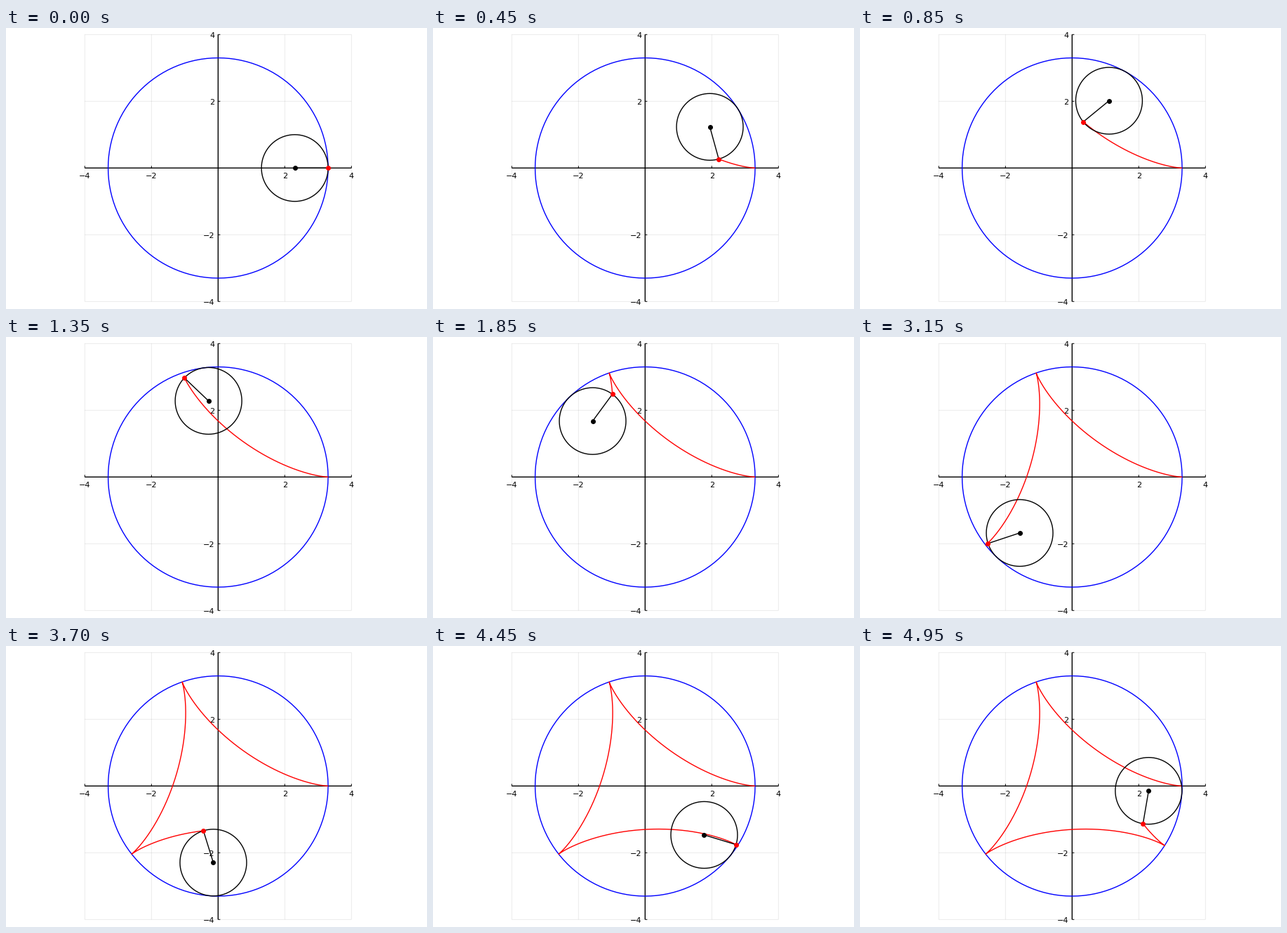
Recreate the animation shown at these times as a matplotlib script. Size 600 by 400 pixels, loop 5 s.

```python
import numpy as np
import matplotlib.pyplot as plt
from matplotlib.animation import FuncAnimation

W, H, DPI = 600, 400, 100
FRAMES, INTERVAL = 100, 50
CX, CY, UNIT = 302.3, 199.3, 47.5   # origin and scale in pixels
R, r = 3.3, 1.0                     # fixed and rolling radius
PX = 72 / DPI                       # points per pixel
LINE = 1.4 * PX


def to_px(x, y):
    return CX + UNIT * np.asarray(x), CY - UNIT * np.asarray(y)


def hypocycloid(t):
    d = R - r
    return (d * np.cos(t) + r * np.cos(d / r * t),
            d * np.sin(t) - r * np.sin(d / r * t))


def circle(x, y, radius):
    a = np.linspace(0, 2 * np.pi, 241)
    return to_px(x + radius * np.cos(a), y + radius * np.sin(a))


fig = plt.figure(figsize=(W / DPI, H / DPI), dpi=DPI, facecolor="white")
ax = fig.add_axes([0, 0, 1, 1])
ax.set_xlim(0, W)
ax.set_ylim(H, 0)
ax.axis("off")


def line(xs, ys, color="black", width=LINE, z=3, **kw):
    return ax.plot(xs, ys, color=color, lw=width, zorder=z, snap=False,
                   solid_capstyle="butt", **kw)[0]


def dot(color, size, z):
    return ax.plot([], [], "o", color=color, ms=size * PX, mew=0,
                   zorder=z, snap=False)[0]


def label(x, y, value, align):
    ax.text(x, y, str(value).replace("-", "\u2212"), ha=align, va="baseline",
            fontsize=8, family="DejaVu Sans", color="black", zorder=2)


# grid, axes, ticks and labels
for v in (-4, -2, 0, 2, 4):
    gx, gy = to_px(v, v)
    if v == 0:
        line(*to_px([-4, 4], [0, 0]), z=2)
        line(*to_px([0, 0], [-4, 4]), z=2)
        continue
    line(*to_px([v, v], [-4, 4]), width=0.9 * PX, z=1, alpha=0.09)
    line(*to_px([-4, 4], [v, v]), width=0.9 * PX, z=1, alpha=0.09)
    line([gx, gx], [CY, CY - 3], width=PX, z=2)
    line([CX, CX + 3], [gy, gy], width=PX, z=2)
    label(gx, 214.3, v, "center")
    label(297.5, gy + 4.6, v, "right")

line(*circle(0, 0, R), color="blue")
trace = line([], [], color="red", z=4)
wheel = line([], [], z=5)
spoke = line([], [], z=6)
hub = dot("black", 7, 7)
pen = dot("red", 7, 8)


def update(i):
    t = 2 * np.pi * i / FRAMES
    hx, hy = (R - r) * np.cos(t), (R - r) * np.sin(t)
    px, py = hypocycloid(t)
    trace.set_data(*to_px(*hypocycloid(np.linspace(0, t, 8 * i + 1))))
    wheel.set_data(*circle(hx, hy, r))
    spoke.set_data(*to_px([hx, px], [hy, py]))
    hub.set_data(*to_px([hx], [hy]))
    pen.set_data(*to_px([px], [py]))
    return trace, wheel, spoke, hub, pen


anim = FuncAnimation(fig, update, frames=FRAMES, interval=INTERVAL,
                     init_func=lambda: update(0), repeat=True,
                     repeat_delay=0, blit=False)
plt.show()
```
